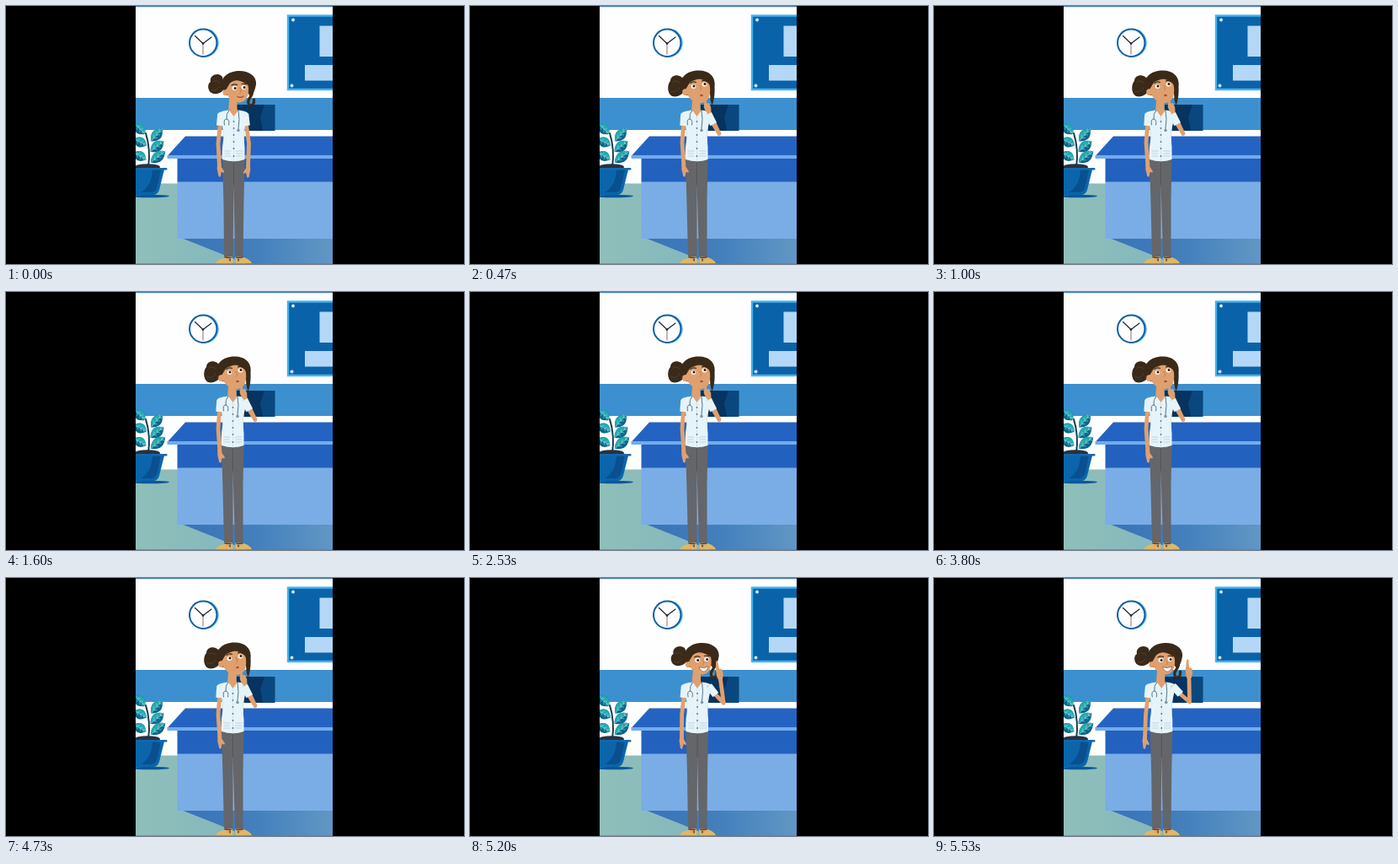
Animation, 544 px wide and 306 px high, one loop 5590 ms. Source, as an HTML page:

```html
<!DOCTYPE html>
<html lang="en">
<head>
<meta charset="utf-8">
<title>Reception desk</title>
<style>
html, body { margin: 0; width: 100%; height: 100%; overflow: hidden; background: #000; }
svg { display: block; width: 544px; height: 306px; }
.skin { fill: #e0a06e; }
.hair { fill: #3b2a19; }
.limb { fill: none; stroke: #e0a06e; stroke-linejoin: round; stroke-linecap: round; }
.sleeve { stroke: #e6f4fa; stroke-width: 8.5; }
.line { fill: none; stroke-linecap: round; stroke-linejoin: round; }
</style>
</head>
<body>
<svg viewBox="0 0 544 306">
  <defs>
    <clipPath id="room"><rect x="154" width="234" height="306"/></clipPath>
    <linearGradient id="floor"><stop offset="0" stop-color="#8fbfb9"/><stop offset="1" stop-color="#79b0c4"/></linearGradient>
    <linearGradient id="shade"><stop offset="0" stop-color="#3873b8"/><stop offset=".5" stop-color="#4380bc"/><stop offset="1" stop-color="#6097c5"/></linearGradient>
  </defs>
  <g clip-path="url(#room)">
    <rect x="154" width="234" height="306" fill="#fefefe"/>
    <rect x="154" width="234" height="1.2" fill="#4d80b4"/>
    <rect x="154" y="109" width="234" height="38" fill="#3d90cf"/>
    <rect x="154" y="210.500" width="234" height="96" fill="url(#floor)"/>

    <!-- clock -->
    <circle cx="235.700" cy="43.700" r="17" fill="#45b3ef"/>
    <circle cx="234.200" cy="43.700" r="17.200" fill="#0d5fa3"/>
    <circle cx="234.200" cy="43.700" r="15.200" fill="#fefefe"/>
    <path class="line" d="M224.500 35.500L234 44.500L244 37" stroke="#1a2433" stroke-width="1.200"/>
    <path class="line" d="M234 44V57" stroke="#8e5a4e" stroke-width=".9"/>
    <circle cx="234" cy="44.500" r="1.300" fill="#1a2433"/>

    <!-- notice board -->
    <rect x="335" y="11.500" width="70" height="87.500" fill="#0a63a8" stroke="#43b2ef" stroke-width="2.400"/>
    <path d="M372.500 23.500H388V60H372.500ZM355 70H388V88.500H355Z" fill="#b5d7f7"/>
    <circle cx="341" cy="16.500" r="2" fill="#cfe6fa"/>
    <circle cx="339.500" cy="94.500" r="2" fill="#cfe6fa"/>

    <!-- monitor -->
    <rect x="274" y="117" width="45.500" height="31" fill="#0a477f"/>
    <path d="M274 117H307L302 132L305 148H274Z" fill="#06335f"/>

    <!-- desk -->
    <path d="M208 275H388V306H286Z" fill="url(#shade)"/>
    <path d="M213 154.500H388V178H191.500Z" fill="#2563c2"/>
    <rect x="203.500" y="180" width="185" height="29" fill="#2361be"/>
    <rect x="203.500" y="208.500" width="185" height="67.500" fill="#7aade5"/>
    <rect x="191.500" y="177" width="197" height="4" fill="#72abec"/>

    <!-- plant -->
    <ellipse cx="171" cy="225.500" rx="23" ry="1.800" fill="#0c5796"/>
    <ellipse cx="168" cy="191" rx="15" ry="3.800" fill="#27323f"/>
    <path d="M154 194H188L182 218Q180 224 175 224H154Z" fill="#0a65ab"/>
    <path d="M174 194H184L179 216Q177 221 172 221H160Q173 214 174 194Z" fill="#0a4f8f"/>
    <rect x="150" y="192" width="41.500" height="2.600" rx="1" fill="#1668ae"/>
    <path class="line" d="M169 191Q172 170 166 151" stroke="#16384f" stroke-width="2"/>
    <g id="leaves"></g>

    <!-- woman -->
    <g id="shoes" fill="#deb866">
      <path d="M249 305.500Q250 301 259 299L268 297.500Q271 301 269 305.500Z"/>
      <path d="M272 298L282 298Q291 301 292 305.500H273Z"/>
      <path d="M261 297L268 296L267 301L262 302ZM274 296L281 297L280 301L275 302Z" class="skin"/>
      <path class="line" d="M260 298L267 298.500M266 300.500V302M274 298.500L281 298M276 300.500V302" stroke="#3f4248" stroke-width="1.500"/>
    </g>
    <path id="legs" fill="#64666a"/>
    <path id="seam" class="line" stroke="#4e5053" stroke-width=".8"/>
    <g id="leftArm"></g>
    <g id="restArm"></g>
    <g id="torso">
      <path class="skin" d="M265.500 107H274.500V122L276 126L270.500 132L264 125Z"/>
      <path d="M252 127Q257 124 265 123.500L270.500 131L276 123.500Q284 124 287.500 127L284 143Q282 154 283.500 168V182Q271 186.500 257 182Q256 171 258 160Q259 150 257 141Z" fill="#e6f4fa"/>
      <path class="line" d="M270.500 131V184M258 155Q259 150 257 142M282.500 155Q282 149 283.500 143" stroke="#c4d8e2" stroke-width=".6"/>
      <path class="line" d="M260 172H267M260 175H266M260 178H267M273.500 172H281M274 175H281M273.500 178H281" stroke="#b4c4cd" stroke-width=".7"/>
      <path class="line" d="M265 123.500Q261 128 262 134M259.500 141Q258 134 262 134Q266 135 264.500 141M276 123.500Q278 134 276 146" stroke="#54788f" stroke-width="1"/>
      <circle cx="276" cy="147.500" r="1.800" fill="#7f98a6"/>
      <g id="buttons" fill="#4f7488"></g>
    </g>
    <g id="head"></g>
    <g id="raisedArm"></g>
    <rect x="154" y="305" width="234" height="1" fill="#4d80a8" opacity=".6"/>
  </g>
</svg>
<script>
const LOOP = 5590, STEPS = 84;
const $ = id => document.getElementById(id);

// Leaf: x, y of its middle, angle, length
$('leaves').innerHTML = [
  [159, 146, 45, 17], [179, 153, -48, 20], [159.5, 161.500, 28, 17],
  [179.5, 166.500, -38, 20], [159, 178, 30, 17], [180.500, 179, -38, 22]
].map(([x, y, a, n]) => {
  const h = n / 2;
  const veins = [-.5, 0, .5].map(k => `M${k * h} 0l2.500 -2.500M${k * h} 0l2.500 2.500`).join('');
  return `<g transform="translate(${x} ${y}) rotate(${a})">
    <path d="M${-h} 0Q0 -12 ${h} 0Q0 12 ${-h} 0Z" fill="#0c668c"/>
    <path d="M${-h} 0Q0 -12 ${h} 0Z" fill="#24a9ae"/>
    <path class="line" d="M${-h} 0H${h}${veins}" stroke="#8fd8d8" stroke-width=".6"/></g>`;
}).join('');

$('buttons').innerHTML = [137, 145, 153, 161, 169, 178]
  .map(y => `<circle cx="270.500" cy="${y}" r=".9"/>`).join('');

const eye = (x, y, look) => `<ellipse cx="${x}" cy="${y}" rx="2.900" ry="2.400" fill="#fff"/>
  <circle cx="${x + look[0]}" cy="${y + look[1]}" r="1.500" fill="#2a1a12"/>`;
const brow = d => `<path class="line" d="${d}" stroke="#3b2a19" stroke-width="1.200"/>`;
const mouths = {
  calm: '<path class="line" d="M275 107.500Q278.500 109.500 282 107" stroke="#a04c3f" stroke-width="1.200"/>',
  smile: '<path d="M273.500 105.500Q279 108 284.500 105Q283 111.500 278.500 111Q275 110.500 273.500 105.500Z" fill="#fff" stroke="#a04c3f" stroke-width=".7"/>'
};
const frontHead = mouth => `
  <path class="hair" d="M257 84C252 78 241 82 243 90C239 92 239 100 244 103C250 106 257 103 260 97Z"/>
  <path class="line" d="M245 90Q250 87 254 91M244 100Q250 101 253 96" stroke="#5a4230" stroke-width=".8"/>
  <path class="hair" d="M256 95C255 83 266 77 277 77C290 77 298 84 297 93C296 99 294 104 291 108L287 103L262 106Z"/>
  <path class="line" d="M292 95Q294 104 289.500 109Q285.500 115 290 118Q295 118 294.500 111" stroke="#3b2a19" stroke-width="3.200"/>
  <ellipse class="skin" cx="260.500" cy="102.500" rx="3" ry="3.800"/>
  <path class="skin" d="M262 97C265 88 274 87 285 88C289 94 289 103 286 109C283 115 276 116 270 112C264 109 261 104 262 97Z"/>
  <path class="hair" d="M259 100Q263 98 264.500 94Q267 88.500 273 88Q282 89 289 95L290 85L268 81L258 88Z"/>
  ${eye(271.500, 97.500, [.6, 0])}${eye(282.500, 96.500, [.6, 0])}
  ${brow('M268 94Q271 92 274.500 93.500')}${brow('M280 92.500Q283 91.500 285.500 93')}
  <path class="line" d="M278 97Q280.500 102 278 103" stroke="#b97c4e" stroke-width=".9"/>
  ${mouths[mouth]}`;
const thinkHead = `
  <path class="hair" d="M253 86C249 80 238 81 238 89C234 93 234 104 240 107C247 109 254 104 256 98Z"/>
  <path class="line" d="M241 90Q246 87 250 92M239 101Q246 103 249 97" stroke="#5a4230" stroke-width=".8"/>
  <path class="hair" d="M250 96C248 84 259 76.500 271 76.500C284 76 292 84 290.500 95C291 104 290 112 287.500 118Q285 112 285 104L256 106Z"/>
  <ellipse class="skin" cx="255.500" cy="102" rx="3.300" ry="4"/>
  <path class="skin" d="M257 97C260 88 270 86 281 86C286 92 286 102 284 108C281 115 273 117 267 113.500C260 110 256 104 257 97Z"/>
  <path class="hair" d="M253 99Q258 97.500 259.500 93Q262 86.500 269 85.500Q280 87 286.500 95L287 84L266 79L252 87Z"/>
  ${eye(265.500, 95.500, [.5, -.6])}${eye(278.500, 93, [.5, -.6])}
  ${brow('M262 91.500Q265 89 268.500 90.500')}${brow('M275.500 89Q278 87.500 281.500 89.500')}
  <path class="line" d="M273 94Q276 99 273.500 100.500" stroke="#b97c4e" stroke-width=".9"/>
  <ellipse cx="275" cy="106" rx="1.700" ry="1.300" fill="#a04c3f"/>`;

const heads = { rest: frontHead('calm'), think: thinkHead, idea: frontHead('smile') };

// Hands lie along +x from the wrist
const hands = {
  rest: 'M-2 -2.200L4 -2.900L13 -1.500L14 .5L8 2.200L9 5L7.500 5.500L2 2.300L-2 2.200Z',
  think: 'M-2 -2.500L3 -3.500L7 -3L14 1.500L14.500 3.500L9 2L8 4.500L3 4.500L-2 2.500Z',
  idea: 'M-2 -2.500L3 -4L9 -4L20 -2.500Q21.500 -1.500 20 -.2L11 .2L10 3.500L4 4.200L-2 2.500Z'
};

// l = left arm, r = right arm: elbow x, y, forearm angle and length
const poses = {
  rest:  { hip: 0,   head: 0,  lx: 252,   ly: 163, la: 87, ln: 26, rx: 288.5, ry: 163, ra: 92, rn: 27 },
  think: { hip: -2,  head: 0,  lx: 252,   ly: 162, la: 86, ln: 27, rx: 296, ry: 151.500, ra: -115, rn: 30 },
  idea:  { hip: -.5, head: -2, lx: 251.5, ly: 162, la: 92, ln: 27, rx: 303.500, ry: 147, ra: -91, rn: 30 }
};

const ease = (t, a, b) => {
  const k = Math.min(1, Math.max(0, (t - a) / (b - a)));
  return k * k * (3 - 2 * k);
};
const blend = (a, b, k) => {
  const out = {};
  for (const key in a) out[key] = a[key] + (b[key] - a[key]) * k;
  return out;
};

function arm(sx, sy, ex, ey, angle, len, hand, flip) {
  const rad = angle * Math.PI / 180;
  const wx = ex + len * Math.cos(rad), wy = ey + len * Math.sin(rad);
  const reach = 12 / Math.hypot(ex - sx, ey - sy);
  return `<path class="limb" stroke-width="4.800" d="M${sx} ${sy}L${ex} ${ey}L${wx} ${wy}"/>
    <path class="skin" transform="translate(${wx} ${wy}) rotate(${angle}) scale(1 ${flip})" d="${hands[hand]}"/>
    <path class="sleeve" d="M${sx} ${sy - 2}L${sx + (ex - sx) * reach} ${sy + (ey - sy) * reach}"/>`;
}

let shownHead = '';
function draw(t) {
  const rise = ease(t, 60, 440), point = ease(t, 4900, 5350);
  const p = point > 0 ? blend(poses.think, poses.idea, point) : blend(poses.rest, poses.think, rise);
  const mood = point > .45 ? 'idea' : rise > .45 ? 'think' : 'rest';
  const h = p.hip;

  $('legs').setAttribute('d', `M${257 + h / 2} 181H${283.5 + h / 2}L${282.5 + h / 2} 230L281.500 297H272L${270.5 + h / 2} 212L269.500 297H259L${258.5 + h / 2} 235Z`);
  $('seam').setAttribute('d', `M${270.5 + h / 2} 186V212`);
  $('torso').setAttribute('transform', `translate(${h / 2} 0)`);
  $('head').setAttribute('transform', `translate(${p.head} 0)`);
  if (mood !== shownHead) $('head').innerHTML = heads[shownHead = mood];

  $('leftArm').innerHTML = arm(255.5 + h / 2, 130, p.lx, p.ly, p.la, p.ln, 'rest', -1);
  const right = arm(284 + h / 2, 130, p.rx, p.ry, p.ra, p.rn, mood, 1);
  $('restArm').innerHTML = mood === 'rest' ? right : '';
  $('raisedArm').innerHTML = mood === 'rest' ? '' : right;
}

const start = performance.now();
function tick() {
  const t = Math.max(0, performance.now() - start) % LOOP;
  draw(Math.floor(t / LOOP * STEPS) * LOOP / STEPS);
  requestAnimationFrame(tick);
}
tick();
</script>
</body>
</html>
```
